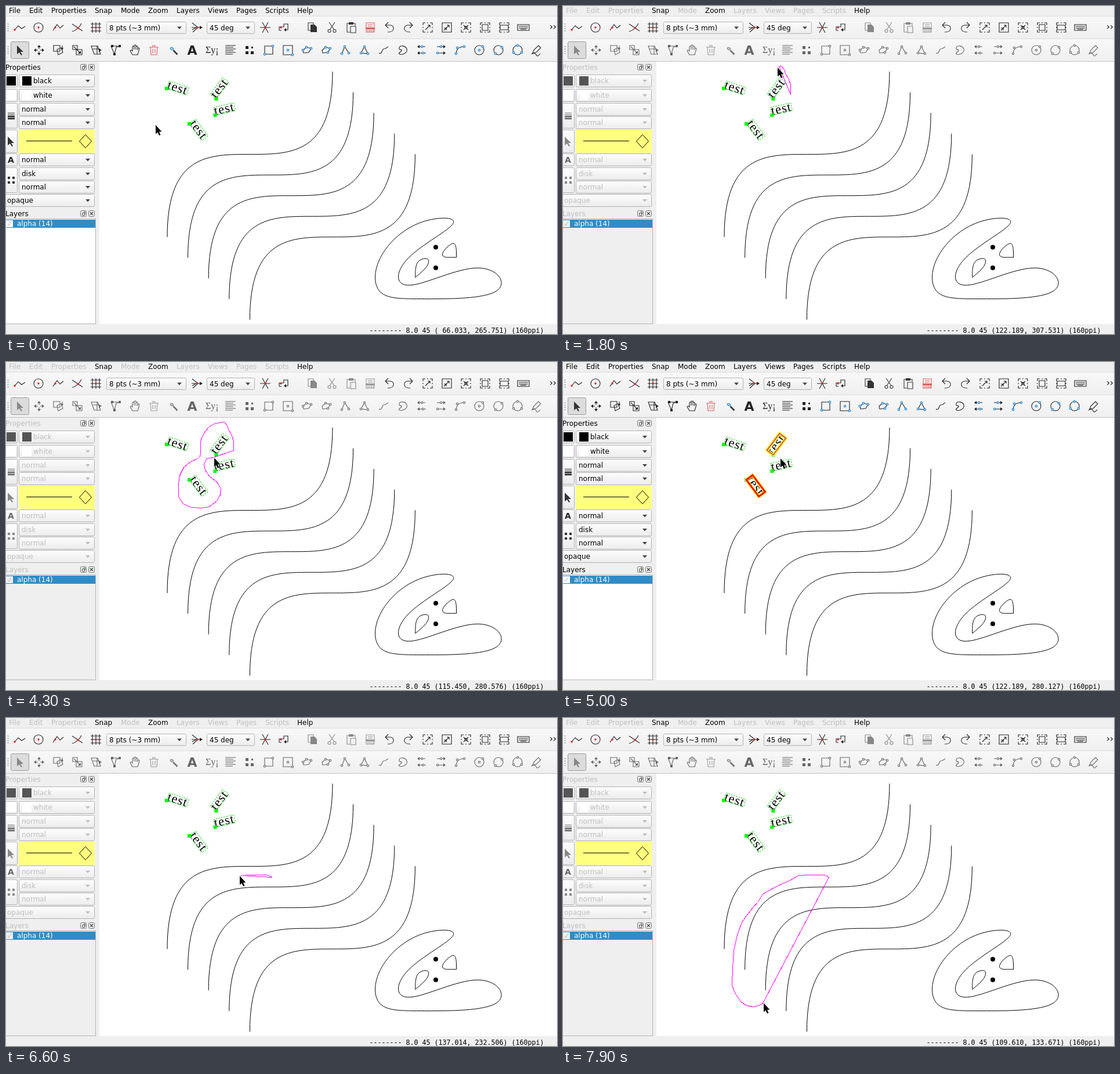
Write an HTML page that moves like this. It is 950 by 565 pixels and loops after 8 s.

```html
<!DOCTYPE html>
<html lang="en">
<head>
<meta charset="utf-8">
<title>Lasso selection</title>
<style>
  html, body { margin: 0; width: 100%; height: 100%; overflow: hidden; background: #efefef; }
  svg {
    display: block; font: 12px "DejaVu Sans", sans-serif;
    --text: #000; --ink: #222; --blue: #1687e0; --red: #e06060; --swatch: #000; --edit: #333;
    --base: #fff; --arrow: #444;
  }
  svg.busy {
    --text: #bebebe; --ink: #666; --blue: #777; --red: #999; --swatch: #555; --edit: #888;
    --base: #efefef; --arrow: #bebebe;
  }
  text { white-space: pre; }
  .dim { fill: var(--text); }
  .line { fill: none; stroke: #000; }
  .tool .s { fill: none; stroke: var(--ink); stroke-width: 1.1; }
  .tool .f { fill: var(--ink); }
  .tool .d { fill: none; stroke: var(--blue); stroke-width: 4.6; stroke-linecap: round; }
  .tool .h { fill: none; stroke: #efefef; stroke-width: 2.2; stroke-linecap: round; }
  .fixed { --ink: #222; }
  .edit { --ink: var(--edit); }
  .trash { --ink: var(--red); }
  .serif { font: 22px "Liberation Serif", serif; letter-spacing: 1.25px; }
  .mono { font: 11.63px "DejaVu Sans Mono", monospace; }
  .crisp { shape-rendering: crispEdges; }
</style>
</head>
<body>
<svg id="stage" width="950" height="565" viewBox="0 0 950 565"></svg>
<script>
const stage = document.getElementById('stage');
const text = (x, y, s, attrs = 'class="dim"') => `<text x="${x}" y="${y}" ${attrs}>${s}</text>`;
const rect = (x, y, w, h, attrs) => `<rect x="${x}" y="${y}" width="${w}" height="${h}" ${attrs}/>`;
const path = (d, attrs = 'class="line"') => `<path d="${d}" ${attrs}/>`;

// Toolbar icons: s = stroke, f = fill, d = node dots, r = red dots, all around (0, 0).
function icon(x, y, { s = '', f = '', d = '', r = '' }, cls = '') {
  return `<g class="tool ${cls}" transform="translate(${x} ${y})">` +
    path(s, 'class="s"') + path(f, 'class="f"') + path(d, 'class="d"') + path(d, 'class="h"') +
    path(r, 'stroke="#e02020" stroke-width="3.4" stroke-linecap="round"') + '</g>';
}
const frame = (x, y, w, h) =>
  rect(x + .5, y + .5, w - 1, h - 1, 'rx="2" fill="url(#face)" stroke="#b2b2b2"');
const combo = (x, y, w, h, label, tx, fixed) => frame(x, y, w, h) +
  text(tx, y + h / 2 + 4.3, label, fixed ? '' : undefined) +
  path(`M${x + w - 16} ${y + h / 2 - 2}h8l-4 4.5z`, `fill="${fixed ? '#444' : 'var(--arrow)'}"`);

function menu() {
  const items = { File: 5, Edit: 40, Properties: 78, Snap: 153, Mode: 198, Zoom: 245, Layers: 294,
    Views: 348, Pages: 397, Scripts: 447, Help: 502 };
  return Object.entries(items).map(([name, x]) =>
    text(x, 12, name, /Snap|Zoom|Help/.test(name) ? '' : undefined)).join('');
}

function snapBar() {
  const corners = 'M-8-4V-8H-4M4-8H8V-4M8 4V8H4M-4 8H-8V4M-1-8H1M-1 8H1M-8-1V1M8-1V1';
  const fixed = [
    [24, { s: 'M-9 4L-3-3 3 2 9-2', r: 'M-9 4h0' }],
    [56, { s: 'M-8 0a8 8 0 1 0 16 0a8 8 0 1 0-16 0', r: 'M0 0h0' }],
    [90, { s: 'M-9 5L-2-5 3 1 9-4', r: 'M-5 0h0' }],
    [123, { s: 'M-9-6L9 6M-9 7C-2 5 4-1 7-7', r: 'M1 1h0' }],
    [155, { s: 'M-6-9V9M0-9V9M6-9V9M-9-6H9M-9 0H9M-9 6H9', r: 'M0 0h0' }],
    [329, { s: 'M-9 0H9M-8-8L2 0-7 8M-8 4L-1 0', f: 'M10 0l-5-3v6z', r: 'M1 0h0' }],
    [447, { s: 'M-9 0H9M-5-9L5 9M5-9L-5 9', r: 'M0 0h0' }],
    [479, { s: 'M-8 5V-1H0V-6H7V4H1M-8 5h4', f: 'M0 4l4-3v6z', r: 'M-5 0h0' }],
    [661, { s: 'M-2-9L-7-4-2 1M-7-4H2Q8-3 7 3Q6 8-3 8' }],
    [694, { s: 'M2-9L7-4 2 1M7-4H-2Q-8-3-7 3Q-6 8 3 8' }],
    [727, { s: corners + 'M-4 4L4-4M0-4H4V0' }],
    [760, { s: 'M-8-8H8V8H-8ZM-5 5L4-4M0 1H-5M-1 1V5M4-4V0M4-4H0' }],
    [793, { s: corners + 'M-4-4L4 4M4-4L-4 4M-2-2H2V2H-2z' }],
    [826, { s: corners + 'M-5-5H5V5H-5Z' }],
    [859, { s: corners + 'M-7-4H7V4H-7Z' }],
    [892, { s: 'M-10-5H10V5H-10ZM-8-2H8M-8 1H8M-5 3H5' }],
  ];
  const edit = [
    [528, { s: 'M-7-8H2V5H-7z', f: 'M-3-5H4L8-1V8H-3z' }],
    [562, { s: 'M-5-9L4 4M5-9L-4 4M-7 6a2.5 2.5 0 1 0 5 0a2.5 2.5 0 1 0-5 0M2 6a2.5 2.5 0 1 0 5 0a2.5 2.5 0 1 0-5 0' }],
    [595, { s: 'M-3-7H-7V8H-2M3-7H7V-3M-1-2H8V9H-1z', f: 'M-4-9H4V-5H-4z' }],
  ];
  return fixed.map(([x, i]) => icon(x, 37, i, 'fixed')).join('') +
    edit.map(([x, i]) => icon(x, 37, i, 'edit')).join('') +
    icon(628, 37, { s: 'M-7-8H7V8H-7ZM-7 1H7M-4 1V8M-1 1V8M2 1V8M5 1V8M-4-5H4M-4-2H4', f: 'M-8 0H8V3H-8z' }, 'trash') +
    combo(173, 27, 138, 21, '8 pts (~3 mm)', 178, true) +
    combo(346, 27, 83, 21, '45 deg', 351, true) +
    text(937, 41, '››', 'font-size="15"');
}

const pointer = 'M-5-8V7L-1 4 2 9 4 8 1 3H6z';
const marks = 'M-6-6h4v4h-4zM2-6h4v4h-4zM-6 2h4v4h-4zM2 2h4v4h-4z';

function modeBar() {
  const ring = 'M-8 0a8 8 0 1 0 16 0a8 8 0 1 0-16 0';
  const kite = 'M-7 0L-1-5 7-3 3 4-6 5z';
  const tools = [
    [57, { s: 'M0-6V-2M0 2V6M-6 0H-2M2 0H6', f: 'M0-9l-3 4h6zM0 9l-3-4h6zM-9 0l4-3v6zM9 0l-4-3v6z' }],
    [90, { s: 'M-8-8H3V2H-8ZM-2-1L5-4 8 4 0 8zM7-8V-3', f: 'M9-4H4l3 4z' }],
    [123, { s: 'M-8-8H0V-1H-8ZM-2-1H8V8H-2ZM-6-6L4 4', f: 'M6 6V1L1 6z' }],
    [156, { s: 'M-9-7H2L7 7H-4zM-6-2H5M1-7V7', f: 'M9 0l-5-3v6z' }],
    [189, { s: 'M-8-7L-2 7 1-5 8-7M-4-7H4', f: 'M-8-9h4v4h-4zM5-9h4v4h-4zM-4 5h4v4h-4z' }],
    [222, { s: 'M-4 8L-8 1Q-6-2-4 2V-6Q-3-8-1-6V-1-8Q1-10 2-8V-1-6Q4-8 5-6V0-3Q8-5 8-2L5 8z' }],
    [288, { s: 'M0 1L7 8M1 0L8 7', d: 'M-3-3h0M-1-2h0' }],
    [387, { s: 'M-9-8H9M-9-5H5M-9-2H9M-9 1H5M-9 4H9M-9 7H4' }],
    [420, { f: 'M-7-7h5v5h-5zM3-6h3v3h-3zM-7 2h5v5h-5zM2 2h5v5h-5z' }],
    [453, { s: 'M-7-7H7V7H-7z', d: 'M-7 7h0M7-7h0' }],
    [486, { s: 'M-8-8H8V8H-8z', d: 'M0 0h0M8 8h0' }],
    [519, { s: kite, d: 'M-7 0h0M-1-5h0M7-3h0' }],
    [552, { s: kite, d: 'M-1-5h0M7-3h0M3 4h0' }],
    [585, { s: 'M-6 6L-1-6 6 5', d: 'M-6 6h0M-1-6h0M6 5h0' }],
    [618, { s: 'M-6 5L0-6 6 6z', d: 'M-6 5h0M0-6h0M6 6h0' }],
    [651, { s: 'M-8 5C-2 8-3-2 0-2S4-3 8-6' }],
    [684, { s: 'M-6-4C-5-9 5-8 7-2S0 9-5 7 0 2-2 0-7 0-6-4z' }],
    [717, { s: 'M-7-6H6M-4 5H7', d: 'M0-6h0M2 5h0', f: 'M-8-6l4-3v6zM-8 5l4-3v6z' }],
    [750, { s: 'M-7-6H6M-6 5H5', d: 'M0-6h0M-6 5h0', f: 'M8-6l-4-3v6zM8 5l-4-3v6z' }],
    [783, { s: 'M-7 6Q-6-6 7-6', d: 'M-7 6h0M-5-4h0M7-6h0' }],
    [816, { s: ring, d: 'M0 0h0M6-6h0' }],
    [849, { s: ring, d: 'M-5 6h0M6-5h0' }],
    [882, { s: ring, d: 'M-7 4h0M0-8h0M7 4h0' }],
    [914, { s: 'M-8 7Q-2 3 0 8T7 6M-6 5L-4 0 4-8 8-4 0 4z' }],
  ];
  return rect(8.5, 61.5, 31, 29, 'rx="2" fill="#dcdcdc" stroke="#9a9a9a"') +
    icon(24, 76, { f: pointer }, 'edit') +
    tools.map(([x, i]) => icon(x, 76, i)).join('') +
    icon(255, 76, { s: 'M-6-5H6L5 8H-5ZM-8-5H8M-2-5V-8H2V-5M-2-2V5M2-2V5' }, 'trash') +
    text(321, 84, 'A', 'text-anchor="middle" font-size="22" font-weight="bold" fill="var(--ink)"') +
    text(344, 81, 'Σy¡', 'font-family="Liberation Serif, serif" font-size="16" fill="var(--ink)"');
}

function dockTitle(y, name) {
  const button = x => rect(x - 4.5, y - 9.5, 10, 10, 'rx="2" fill="none" stroke="#777"');
  return text(-1, y, name) + button(133) + button(147) +
    path(`M131.5 ${y - 5.5}h4v4h-4zM133.5 ${y - 7.5}h3v4`, 'fill="none" stroke="#555"') +
    path(`M145 ${y - 7}l5 5m0-5l-5 5`, 'stroke="#444" stroke-width="1.3"');
}

function sidebar() {
  const combos = [['normal', 167], ['normal', 190], ['normal', 254], ['disk', 278], ['normal', 301]];
  const swatch = (x, y, fill) => rect(x, y, 16, 16, `fill="${fill}"`);
  return dockTitle(110, 'Properties') + dockTitle(362, 'Layers') +
    [[118, 22], [143, 22], [167, 44], [213, 40], [254, 22], [278, 44]]
      .map(([y, h]) => frame(-8, y, 28, h)).join('') +
    combo(22, 118, 131, 22, 'black', 47) + combo(22, 143, 131, 22, 'white', 47) +
    combos.map(([label, y]) => combo(22, y, 131, 22, label, 27)).join('') +
    combo(-8, 324, 161, 22, 'opaque', 2) +
    swatch(1, 121, 'var(--swatch)') + swatch(28, 121, 'var(--swatch)') +
    swatch(1, 146, '#fff') + swatch(28, 146, '#fff') +
    path('M3 184.5h12M3 187.5h12', 'stroke="var(--ink)"') +
    path('M3 190.5h12M3 194h12', 'stroke="var(--ink)" stroke-width="2.4"') +
    icon(8, 233, { f: pointer }, 'edit') + icon(9, 300, { f: marks }, 'edit') +
    text(3, 270, 'A', 'font-size="14" font-weight="bold" fill="var(--ink)"') +
    rect(22, 213, 131, 40, 'fill="#ffff7f"') +
    path('M35 232.5H114', 'class="line crisp"') + path('M126.5 233L137 221.5 147.5 233 137 244.5z') +
    rect(-1, 366.5, 155.5, 181, 'fill="var(--base)" stroke="#b4b4b4"') +
    rect(0, 368, 154, 14, 'fill="#308cc6"') +
    rect(-1, 369, 13, 12, 'fill="var(--base)"') + path('M3 375l2 3 4-7', 'fill="none" stroke="#bbb"') +
    text(19, 379, 'alpha (14)', 'fill="#fff"');
}

// Closed uniform cubic B-spline as Bézier segments.
function closedSpline(points) {
  const n = points.length, at = i => points[i % n];
  const mix = (a, b, k) => a.map((v, i) => v + (b[i] - v) * k);
  const knot = i => mix(mix(at(i + n - 1), at(i), 2 / 3), mix(at(i), at(i + 1), 1 / 3), .5);
  let d = 'M' + knot(0);
  for (let i = 0; i < n; i++)
    d += `C${mix(at(i), at(i + 1), 1 / 3)} ${mix(at(i), at(i + 1), 2 / 3)} ${knot(i + 1)}`;
  return d;
}
const parse = s => s.trim().split(/\s+/).map(p => p.split(',').map(Number));

const labels = [[277, 142, 18], [362.5, 160, -53], [360.5, 188, -13], [316, 203, 53]];
const box = attrs => rect(0, -13.5, 36, 13.5, 'fill="none" ' + attrs);
const placed = ([x, y, angle], body) => `<g transform="translate(${x} ${y}) rotate(${angle})">${body}</g>`;

function drawing() {
  const waves = [0, 1, 2, 3, 4].map(i => 35.6 * i).map(shift =>
    path(`M${278 + shift} ${398 + shift}c0-285 285 0 285-285`)).join('');
  const blob = closedSpline(parse(`633.5,433.6 705.8,362.4 812.6,362.4 670.2,433.6 670.2,507
    830,424 884,504.5 705.8,504.5 633.5,504.5`));
  const tests = labels.map(l => placed(l, text(0, 0, 'test', 'class="serif"') +
    box('stroke="#0d0" stroke-dasharray="2.5 2"')) +
    rect(l[0] - 3, l[1] - 3, 6, 6, 'fill="#0f0"')).join('');
  return rect(161, 96, 789, 452, 'fill="#fff"') + waves + path(blob) +
    path('M705.8 467.5C705.5 448 707 437 722 435C732 434 730 444 722 453Q716 459 705.8 467.5z') +
    path('M776.5 433V424C776 405 771 406 760 416C748 428 752 433 762 433z') +
    '<circle cx="741" cy="415.5" r="4"/><circle cx="741" cy="451" r="4"/>' + tests;
}

const selection = placed(labels[1], box('stroke="#ff0" stroke-width="5"') + box('stroke="#c030a0" stroke-width="1.6"')) +
  placed(labels[3], box('stroke="#ff0" stroke-width="5"') + box('stroke="#f00" stroke-width="3"'));

const gradient = (id, top, bottom) => `<linearGradient id="${id}" x2="0" y2="1">
  <stop stop-color="${top}"/><stop offset="1" stop-color="${bottom}"/></linearGradient>`;
stage.innerHTML = `<defs>${gradient('face', '#fdfdfd', '#ececec')}${gradient('bar', '#f8f8f8', '#efefef')}</defs>` +
  rect(0, 0, 950, 565, 'fill="#efefef"') +
  rect(0, 18, 950, 38, 'fill="url(#bar)"') + rect(0, 57, 950, 38, 'fill="url(#bar)"') +
  path('M0 17.5H950M0 56.5H950', 'class="crisp" stroke="#dcdcdc"') +
  path('M0 95.5H950', 'class="crisp" stroke="#c0c0c0"') +
  path('M3.5 30v15M3.5 69v15', 'stroke="#aaa" stroke-width="2" stroke-dasharray="2 2"') +
  menu() + snapBar() + modeBar() + sidebar() + drawing() +
  `<g id="selection">${selection}</g>` +
  path('', 'id="lasso" class="crisp" fill="none" stroke="#f0f" transform="translate(.5 .5)"') +
  text(626.5, 563, '', 'id="status" class="mono"') +
  path('M0 0V15.5L3.5 12.5 6 18 8.5 17 6 11.5H10.5z',
    'id="cursor" stroke="#fff" stroke-width="1.4" paint-order="stroke"');
const [marked, lasso, status, cursor] =
  ['selection', 'lasso', 'status', 'cursor'].map(id => document.getElementById(id));

const approach = parse('258,204 262,200 388,162');
const firstLoop = parse(`392,152 392,135 388,124 383,116 381,109 376,103 368,104 358,106 349,112 343,119
  336,132 335,140 335,158 334,162 330,166 318,171 306,181 299,195 297,209 297,232 305,244 320,250
  336,251 350,249 363,239 369,228 370,218 364,207 351,197 343,186 341,176 345,166 357,164 365,165 372,165`);
const crossing = parse('419,204 467,277');
const secondLoop = parse(`458,274 455,272 450,270 420,270 405,271 390,280 375,286 345,302 335,317 322,332
  308,351 302,368 300,373 294,400 292,430 291,460 296,473 306,488 316,495 328,497 337,495 344,491`);
const route = [...approach, ...firstLoop, ...crossing, ...secondLoop];
const firstStart = approach.length;
const secondStart = firstStart + firstLoop.length + crossing.length;

// Moves along the route: first tick, last tick, route index reached.
const TICK = 100, LOOP = 8000;
const moves = [[100, 200, 1], [500, 1000, 2], [1100, 1200, 3], [1400, 2200, 13], [2300, 2600, 17],
  [3600, 3800, 25.4], [4100, 4300, 35], [4400, 4500, 36.6], [4700, 4700, 37], [5500, 5500, 38],
  [5700, 5900, 39], [6100, 6400, 40], [6600, 6600, 44], [6700, 6800, 47.2], [7000, 7200, 52.6],
  [7400, 7900, 61]];

function progress(t) {
  let value = 0;
  for (const [start, end, target] of moves) {
    if (t < start) break;
    value += (target - value) * Math.min(1, (t - start + TICK) / (end - start + TICK));
  }
  return value;
}

// The cursor runs slightly ahead of the last recorded point.
function cursorAt(index, [x, y]) {
  const [fromX, fromY] = route[Math.max(0, Math.ceil(index) - 1)];
  const lead = 2.5 / (Math.hypot(x - fromX, y - fromY) || 1);
  return [x + (x - fromX) * lead, y + 1 + (y - fromY) * lead].map(Math.round);
}

function draw(now) {
  const t = Math.floor(now % LOOP / TICK) * TICK;
  const index = progress(t), whole = Math.floor(index);
  const next = route[Math.min(whole + 1, route.length - 1)];
  const head = route[whole].map((v, i) => Math.round(v + (next[i] - v) * (index - whole)));

  const selected = t >= 5000 && t < 6300;
  stage.classList.toggle('busy', t >= 900 && !selected);
  marked.style.display = selected ? '' : 'none';

  const start = index > secondStart ? secondStart : index > firstStart && t < 5000 ? firstStart : -1;
  lasso.setAttribute('d', start < 0 ? '' : `M${[...route.slice(start, whole + 1), head].join('L')}z`);
  cursor.setAttribute('transform', `translate(${cursorAt(index, head)})`);

  const [x, y] = t < TICK ? [247, 197] : head;
  const unit = .449249;
  const coord = v => v.toFixed(3).padStart(7);
  status.textContent = `-------- 8.0 45 (${coord(129.3768 + (x - 388) * unit)}, ` +
    `${coord(281.47425 - (y - 162) * unit)}) (160ppi)`;
  requestAnimationFrame(draw);
}
requestAnimationFrame(draw);
</script>
</body>
</html>
```
